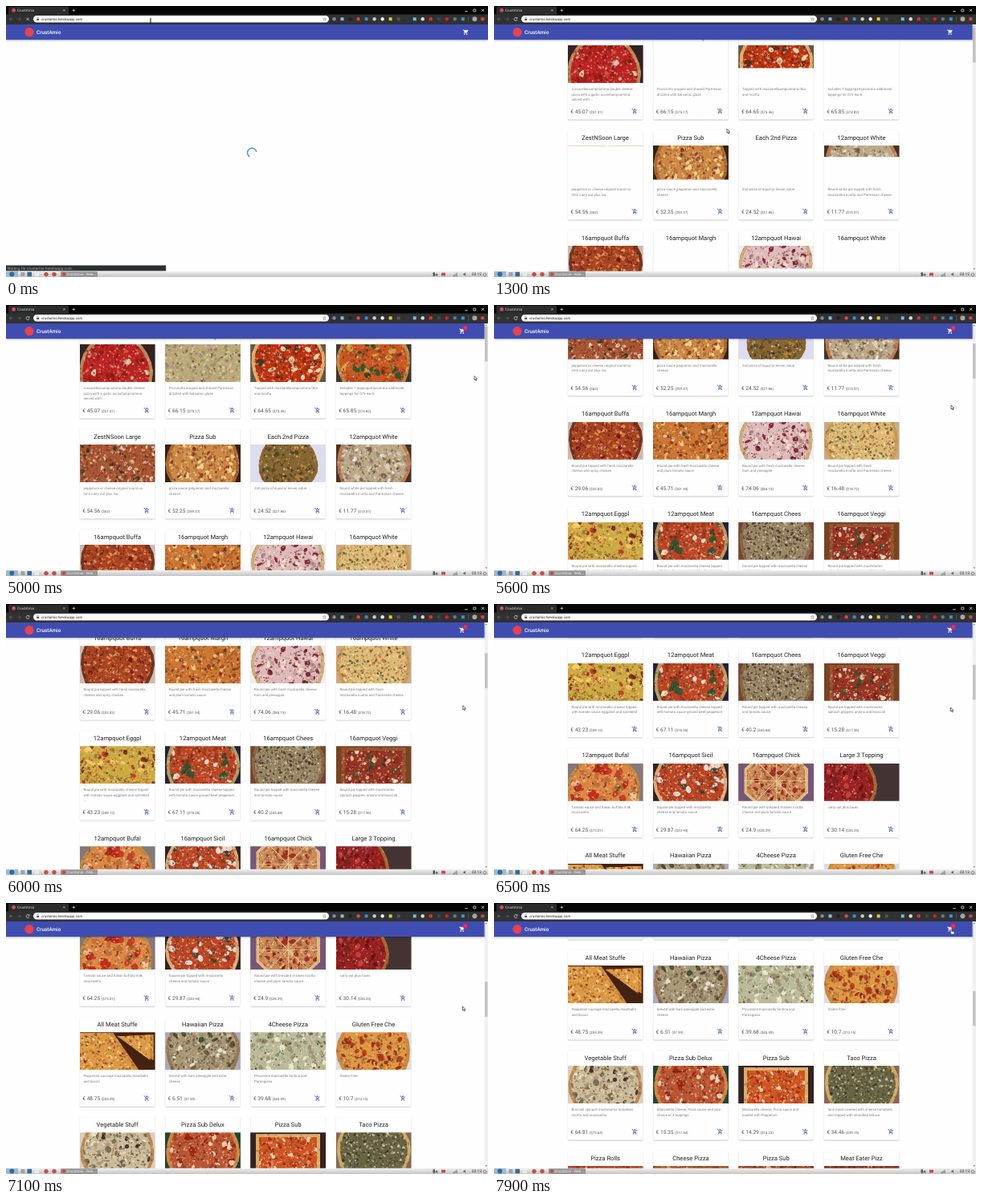
An HTML page with a canvas that plays this animation: 600x338 px, repeating every 8000 ms.

```html
<!DOCTYPE html>
<html lang="en">
<head>
<meta charset="utf-8">
<title>Crustamio</title>
<style>
html, body { margin: 0; width: 100%; height: 100%; overflow: hidden; background: #fefefe; }
canvas { display: block; width: 600px; height: 338px; }
</style>
</head>
<body>
<canvas id="stage"></canvas>
<script>
const W = 600, H = 338, LOOP = 8000, LOADED = 500;
const BLUE = '#3f4db0';
const scale = Math.max(1, window.devicePixelRatio || 1);
const canvas = document.getElementById('stage');
canvas.width = W * scale;
canvas.height = H * scale;
const g = canvas.getContext('2d');

// title | description lines (/) | euro | dollar | picture: shape, backdrop, crust, base, three toppings, topping size
const CARDS = `
Double Cheese|a saucelessampcomma double cheese/pizza with a garlic accentampcomma/served with ...|45.07|51.31|l 322 b85 b22 edb 821 d54 4
Prosciutto Spec|Prosciutto arugula and shaved Parmesan/drizzled with balsamic glaze|66.15|75.17|f a97 b97 ba7 896 b88 dcb 3
Feta Ricotta|Topped with mozzarellaampcomma feta/and ricotta|64.65|73.46|o 654 da6 b31 fec 432 fda 5
Choice of Three|Includes 1 toppingampcomma additional/toppings for 075 each|65.85|74.82|o 433 b84 c52 253 da4 342 5
ZestNSoon Large|pepperoni or cheese original round no/limit carry out plus tax|54.56|62|f 321 943 a53 edc 332 ca7 3
Pizza Sub|pizza sauce pepperoni and mozzarella/cheese|52.25|59.37|o 321 a63 c84 fd9 832 fd8 3
Each 2nd Pizza|2nd pizza of equal or lesser value|24.52|27.86|p dde 863 863 453 b83 542 3
12ampquot White|Round white pie topped with fresh/mozzarella ricotta and Parmesan cheese|11.77|13.37|o 432 b75 ba8 eee 754 dcb 4
16ampquot Buffa|Round pie topped with fresh mozzarella/cheese and spicy chicken|29.06|33.02|o cba 732 a42 d84 711 e95 3
16ampquot Margh|Round pie with fresh mozzarella cheese/and plum tomato sauce|45.71|51.94|f 532 c73 c73 fc8 a31 543 3
12ampquot Hawai|Round pie with fresh mozzarella cheese/ham and pineapple|74.06|84.15|o eee ca7 dbb 712 812 fdc 4
16ampquot White|Round pie topped with fresh/mozzarella ricotta and Parmesan cheese|16.48|18.72|o ca8 c95 db7 463 c63 fd9 2
12ampquot Eggpl|Round pie with mozzarella cheese topped/with tomato sauce eggplant and sprinkled/...|43.23|49.12|f 542 c83 ca4 b32 fc6 721 4
12ampquot Meat|Round pie with mozzarella cheese topped/with tomato sauce ground beef pepperoni|67.11|76.26|o 223 b96 b42 fed 253 d64 5
16ampquot Chees|Round pie topped with mozzarella cheese/and tomato sauce|40.2|45.68|o 743 864 986 533 cba 432 2
16ampquot Veggi|Round pie topped with mushrooms/spinach peppers onions and broccoli|15.28|17.36|r 742 953 932 fed 353 eda 4
12ampquot Bufal|Tomato sauce and Italian buffalo milk/mozzarella|64.25|73.01|l 877 b84 d84 b32 b21 ec9 7
16ampquot Sicil|Square pie topped with mozzarella/cheese and tomato sauce|29.87|33.94|o 322 da7 b42 fee eed 343 5
16ampquot Chick|Round pie with breaded chicken ricotta/cheese and plum tomato sauce|24.9|28.29|h 757 db8 c85 921 922 db8 4
Large 3 Topping|carry out plus taxes|30.14|34.25|s 433 a63 922 611 c44 722 5
All Meat Stuffe|Pepperoni sausage mozzarella meatballs/and bacon|48.75|55.39|w 421 c83 d94 fd9 eb6 a42 2
Hawaiian Pizza|Served with ham pineapple and extra/cheese|6.51|7.39|o aab 975 a97 343 eed 653 4
4Cheese Pizza|Provolone mozzarella fontina and/Parmigiana|39.68|45.09|f 665 aa8 bb9 785 eed 986 4
Gluten Free Che|Gluten Free|10.7|12.15|o ddd c84 d94 a32 b31 921 4
Vegetable Stuff|Broccoli spinach mushrooms tomatoes/ricotta and mozzarella|64.81|73.64|o dcb b85 cb9 322 eec 664 4
Pizza Sub Delux|Mozzarella cheese, Pizza sauce and your/choice of 3 toppings.|15.35|17.44|o 243 c84 b53 e96 fdb 921 4
Pizza Sub|Mozzarella cheese, Pizza sauce and/loaded with Pepperoni|14.29|16.23|r 322 da6 c52 a21 fdb e85 3
Taco Pizza|taco meat covered with cheese tomatoes/and topped with shredded lettuce|34.46|39.15|o 865 ca6 664 dcb 332 764 2
Pizza Rolls||9.5|10.82|f 433 a53 b42 d94 821 543 3
Cheese Pizza||11.2|12.75|f 332 963 a52 ca6 643 321 3
Pizza Sub||12.6|14.34|f 433 852 a42 dba 721 532 3
Meat Eater Pizz||18.3|20.83|f 322 842 932 c84 621 432 3`.trim().split('\n').map((row, i) => {
  const [title, desc, euro, usd, look] = row.split('|');
  return { title, lines: desc.split('/'), euro, usd, photo: paintPizza(look.split(' '), i + 7) };
});

function randomizer(seed) {
  let s = seed * 7919 + 17;
  return () => (s = (s * 16807) % 2147483647) / 2147483647;
}

function paintPizza([shape, ...look], seed) {
  const size = +look.pop();
  const [bg, crust, base, ...tops] = look.map(c => '#' + c);
  const c = document.createElement('canvas');
  c.width = 94 * 2 * scale;
  c.height = 47 * 2 * scale;
  const p = c.getContext('2d'), rnd = randomizer(seed);
  p.scale(2 * scale, 2 * scale);
  p.fillStyle = bg;
  p.fillRect(0, 0, 94, 47);
  const body = inset => {
    p.beginPath();
    if (shape === 'f') p.rect(-5, -5, 104, 57);
    else if (shape === 'r') p.rect(7 + inset, 2 + inset, 80 - 2 * inset, 60);
    else if (shape === 'w') {
      p.moveTo(-5, 1); p.lineTo(42 - inset, 1); p.lineTo(76 - inset, 50); p.lineTo(-5, 50); p.closePath();
      p.moveTo(47, 5); p.lineTo(92 - inset, 3); p.lineTo(92 - inset, 35); p.closePath();
    } else if (shape === 'h') {
      for (let i = 0; i < 8; i++) {
        const a = (i + 0.5) * Math.PI / 4;
        p.lineTo(47 + Math.cos(a) * (43 - inset), 22 + Math.sin(a) * (40 - inset));
      }
      p.closePath();
    } else {
      const [x, y, r] = { l: [45, 34, 46], s: [22, 27, 44], p: [47, 25, 37] }[shape] || [47, 23, 46];
      for (let i = 0; i < 24; i++) {
        const a = i * Math.PI / 12, wave = Math.sin(a * 5 + seed) * 0.7;
        p.lineTo(x + Math.cos(a) * (r - inset + wave), y + Math.sin(a) * (r - inset + wave));
      }
      p.closePath();
    }
  };
  const blob = (color, r, alpha) => {
    p.globalAlpha = alpha;
    p.fillStyle = color;
    p.beginPath();
    p.ellipse(rnd() * 94, rnd() * 47, r, r * (0.4 + rnd() * 0.5), rnd() * 3, 0, 7);
    p.fill();
  };
  const pick = list => list[Math.floor(rnd() * list.length)];
  const layer = (inset, color, sprinkle) => {
    p.save();
    body(inset);
    p.globalAlpha = 1;
    p.fillStyle = color;
    p.fill();
    p.clip();
    sprinkle();
    p.restore();
  };
  layer(0, crust, () => {
    for (let i = 0; i < 160; i++) blob(pick(['#421', '#fda']), 0.6 + rnd() * 1.6, 0.3);
  });
  layer(4, base, () => {
    const crumbs = [...tops, crust, '#311', '#fec'];
    for (let i = 0; i < 300 / (size * size) + 12; i++) {
      blob('#311', size * 0.8, 0.2);
      blob(pick(tops), size * (0.6 + rnd() * 0.5), 0.85);
    }
    for (let i = 0; i < 420; i++) blob(pick(crumbs), 0.5 + rnd() * 1.2, 0.5);
  });
  if (shape === 'h') {
    p.strokeStyle = '#e8cfa4';
    p.lineWidth = 0.8;
    for (let i = 0; i < 4; i++) {
      const a = i * Math.PI / 4, x = Math.cos(a) * 40, y = Math.sin(a) * 40;
      p.beginPath(); p.moveTo(47 - x, 22 - y); p.lineTo(47 + x, 22 + y); p.stroke();
    }
  }
  return c;
}

// Keyed values: each point is [time, ...values]
function follow(points, t, ease = k => k) {
  let i = 0;
  while (i < points.length - 2 && t >= points[i + 1][0]) i++;
  const [a, b] = [points[i], points[i + 1]];
  const k = ease(Math.min(1, Math.max(0, (t - a[0]) / (b[0] - a[0]))));
  return a.slice(1).map((v, n) => v + (b[n + 1] - v) * k);
}
const smooth = k => k * k * (3 - 2 * k);
const SCROLL = [[5100, 0], [5600, 153], [6100, 270], [6500, 350], [7100, 512.5], [7450, 596]];
const POINTER = [[300, 180, 18], [900, 290, 130], [1400, 290, 156], [1850, 290, 156], [2450, 174, 130],
  [2700, 174, 130], [2900, 232, 145], [3300, 278, 146], [3450, 278, 146], [4300, 568, 31], [4500, 568, 31],
  [5000, 583, 88.5], [5600, 569, 125], [6500, 568.5, 129], [7350, 568.5, 129], [7800, 569, 33]];

function box(x, y, w, h, color, r = 0) {
  g.fillStyle = color;
  g.beginPath();
  g.roundRect(x, y, w, h, r);
  g.fill();
}
function dot(x, y, r, color) {
  g.fillStyle = color;
  g.beginPath();
  g.arc(x, y, r, 0, 7);
  g.fill();
}
function text(s, x, y, size, color, align = 'left', weight = 400) {
  g.font = `${weight} ${size}px Roboto, sans-serif`;
  g.textRendering = 'geometricPrecision';
  g.fillStyle = color;
  g.textAlign = align;
  g.fillText(s, x, y);
  return g.measureText(s).width;
}
function draw(path, x, y, color, width, k = 1, fill) {
  g.save();
  g.translate(x, y);
  g.scale(k, k);
  const p = new Path2D(path);
  if (fill) { g.fillStyle = fill; g.fill(p); }
  g.strokeStyle = color;
  g.lineWidth = width;
  g.stroke(p);
  g.restore();
}
function shadowed(alpha, blur, drop, paint) {
  g.save();
  g.shadowColor = `rgba(0,0,0,${alpha})`;
  g.shadowBlur = blur * scale;
  g.shadowOffsetY = drop * scale;
  paint();
  g.restore();
}

function cart(x, y, size, color, plus) {
  const k = size / 24, left = x - size / 2, top = y - size / 2;
  draw('M1 3h3l5 9h7l4-7M8 12l-2 4h13', left, top, color, 2.3, k);
  if (plus) draw('M12 1v8M8 5h8', left, top, color, 2.3, k);
  else draw('M5 4h16l-4 8H9z', left, top, color, 1, k, color);
  dot(left + 7 * k, top + 20 * k, 2.2 * k, color);
  dot(left + 17 * k, top + 20 * k, 2.2 * k, color);
}

function card(c, i, t, scroll) {
  const x = 91.6 + (i % 4) * 106.3, y = 39 + Math.floor(i / 4) * 125 - scroll;
  if (y > 345 || y < -70) return;
  shadowed(0.2, 1.2, 0.8, () => box(x + 0.4, y - 9, 93.2, 111.6, '#fefefe', 1.5));
  text(c.title, x + 47, y + 2.7, 7.6, '#222', 'center');

  const start = 1000 + (i * 5 % 8) * 75;
  const shown = Math.min(1, Math.max(0, (t - start) / 250));
  if (shown > 0) {
    g.save();
    g.beginPath();
    g.rect(x, y + 10, 94, 47 * shown);
    g.clip();
    g.drawImage(c.photo, x, y + 10, 94, 47);
    g.restore();
  }
  c.lines.forEach((s, n) => text(s, x + 4.9, y + 66.2 + n * 6.4, 4.4, '#808080'));
  const w = text('€ ' + c.euro, x + 3.7, y + 95.2, 6.6, '#555');
  text(`($${c.usd})`, x + 5.3 + w, y + 95.2, 4.4, '#555');
  if (i === 0 && t > 2450 && t < 4400) dot(x + 83.6, y + 92.6, 6.3, '#e1e3ef');
  cart(x + 83.5, y + 92.3, 7.6, BLUE, true);
}

function header(loaded, t) {
  const right = loaded ? 595.5 : 600;
  shadowed(0.3, 2, 0.8, () => box(0, 23, right, 19, BLUE));
  dot(29, 32.7, 5.6, '#e5434f');
  text('CrustAmio', 38, 35.1, 6.4, '#fff', 'left', 500);
  const x = loaded ? 567.6 : 572.2;
  cart(x, 32.7, 7.6, '#fff');
  if (t >= 2700) {
    dot(x + 4.2, 28.9, 3.1, '#d9265c');
    text('1', x + 4.2, 30.3, 3.8, '#f3a9bf', 'center');
  }
}

function scrollbar(scroll) {
  box(595.5, 23, 4.5, 308, '#f1f1f1');
  box(596.1, 27 + scroll * 0.139, 3.4, 43.5, '#c1c1c1');
  draw('M-1 .6L0-.6L1 .6z', 597.8, 25.2, '#777', 0.2, 1, '#777');
  draw('M-1-.6L0 .6L1-.6z', 597.8, 328, '#555', 0.2, 1, '#555');
}

const ADDONS = '889 8bd 222 d44 48c ccc eee dc3 555 333 7bd ddc d33 444 c23 678 39c'.split(' ');
function browser(loaded) {
  box(0, 0, W, 11, '#050505');
  box(3, 0.8, 75, 11, '#2b2b2c', 2);
  box(0, 10.6, W, 12.4, '#303132');
  dot(9.6, 5.4, 2.3, '#d8525a');
  text('CrustAmio', 14, 7, 4.5, '#ddd');
  draw('M-1.2-1.2L1.2 1.2M1.2-1.2L-1.2 1.2', 72.3, 5.4, '#ddd', 0.6);
  draw('M-1.8 0H1.8M0-1.8V1.8', 84.3, 5.4, '#ddd', 0.7);
  draw('M-1.8 1.4H1.8', 573, 5.4, '#eee', 0.8);
  draw('M-1.5-1.3H1.5V1.5H-1.5z', 583.3, 5.4, '#eee', 0.7);
  draw('M-1.5-1.5L1.5 1.5M1.5-1.5L-1.5 1.5', 593.6, 5.4, '#eee', 0.8);
  draw('M2 0H-2M0-2L-2 0L0 2', 6.5, 16.4, '#777', 0.7);
  draw('M-2 0H2M0-2L2 0L0 2', 16.5, 16.4, '#666', 0.7);
  if (loaded) draw('M1.5-1.3A2 2 0 1 0 2 .5M2-2.2V-.7H.5', 27, 16.4, '#ddd', 0.7);
  else draw('M-1.7-1.7L1.7 1.7M1.7-1.7L-1.7 1.7', 27, 16.4, '#ddd', 0.7);
  box(34, 12, 368, 8.6, '#fdfdfd', 4.3);
  box(38.2, 15.9, 2.8, 2.2, '#555', 0.3);
  draw('M-.8 0V-.9A.8.8 0 0 1 .8-.9V0', 39.6, 15.9, '#555', 0.5);
  text('crustamio.herokuapp.com', 44, 17.9, 4.4, '#222');
  draw('M0-2L.6-.6L2-.5L.9.5L1.3 2L0 1.1L-1.3 2L-.9.5L-2-.5L-.6-.6z', 396.4, 16.3, '#555', 0.4);
  ADDONS.forEach((c, i) => {
    const x = 408.5 + i * 10.02;
    if (i % 3 === 1) box(x - 2, 14.3, 4, 4, '#' + c, 0.5);
    else dot(x, 16.3, 2.2, '#' + c);
  });
  box(575.6, 13, 0.5, 7, '#666');
  dot(583.4, 16.3, 3, '#a9a5a2');
  dot(593.3, 16.3, 2.3, '#d3473d');
}

function taskbar(t) {
  const shade = g.createLinearGradient(0, 330.7, 0, H);
  shade.addColorStop(0, '#f1f1f1');
  shade.addColorStop(1, '#c4c4c4');
  box(0, 330.7, W, 7.3, shade);
  box(0, 331, 15, 7, '#9fb9cf');
  dot(7.3, 334.6, 3, '#2f6aa3');
  box(18.5, 332, 5, 5, '#98a4ad', 0.5);
  box(26.5, 331.8, 5.5, 5.5, '#356a92', 0.5);
  box(35.5, 332, 5.5, 5, '#e8eaeb', 0.5);
  dot(50, 334.6, 2.7, '#c94b42');
  dot(60, 334.6, 2.7, '#c94b42');
  box(68, 331.2, 46, 6.8, '#969696', 0.8);
  dot(72, 334.6, 2.4, '#c94b42');
  text('CrustAmio - Web...', 75.5, 336.2, 4.4, '#eee');
  box(531.5, 332.3, 2.5, 4.5, '#555');
  dot(536, 335.2, 1.6, '#777');
  box(542, 332.8, 5, 3.6, '#cc4a4a', 0.5);
  for (let i = 0; i < 5; i++) box(556 + i * 1.2, 336.5 - i, 0.8, i + 0.7, '#777');
  draw('M-1.5-.6H-.5L.7-1.8V1.8L-.5.6H-1.5z', 571, 334.6, '#555', 0.3, 1, '#555');
  text(t < 1400 ? '02:12' : '02:13', 580, 336.3, 4.8, '#222');
  draw('M-1-1.5A1.9 1.9 0 1 0 1-1.5M0-2.3V0', 596, 334.7, '#555', 0.6);
}

function pointer(t) {
  const [x, y] = follow(POINTER, t, smooth);
  const overCart = Math.abs(x - 568) < 5 && y < 38 && y > 26;
  const overAdd = Math.abs(x - 175) < 5 && Math.abs(y - 131) < 5;
  if (y < 22) draw('M-1-2.6Q0-2.6 0-2V2Q0 2.6-1 2.6M1-2.6Q0-2.6 0-2V2Q0 2.6 1 2.6', x, y, '#111', 0.6);
  else if (overCart || overAdd)
    draw('M0 0Q.6-.6 1.1 0V2.2L3.5 2.7Q4.2 3 4 4L3.4 6H.5L-1.3 3.6Q-1 2.7 0 3.3z', x, y, '#222', 0.5, 1, '#fff');
  else draw('M0 0V5L1.1 4L1.9 5.9L2.8 5.5L2 3.7H3.6z', x, y, '#111', 0.6, 1, '#fff');
}

function render(t) {
  g.setTransform(scale, 0, 0, scale, 0, 0);
  const loaded = t >= LOADED, [scroll] = follow(SCROLL, t);
  box(0, 0, W, H, '#fefefe');
  if (loaded) {
    CARDS.forEach((c, i) => card(c, i, t, scroll));
    scrollbar(scroll);
  } else {
    const a = t / 1400 * Math.PI * 2;
    g.strokeStyle = '#4497d6';
    g.lineWidth = 1.5;
    g.beginPath();
    g.arc(306.2, 183, 5.7, a + 2.1, a + 6.05);
    g.stroke();
  }
  header(loaded, t);
  browser(loaded);
  if (!loaded) {
    box(0, 323.6, 199, 7, '#2d2e30');
    text('Waiting for crustamio.herokuapp.com...', 1.5, 328.7, 4.8, '#aaa');
  }
  taskbar(t);
  pointer(t);
}

const begin = performance.now();
function tick() {
  render((performance.now() - begin) % LOOP);
  requestAnimationFrame(tick);
}
tick();
</script>
</body>
</html>
```
